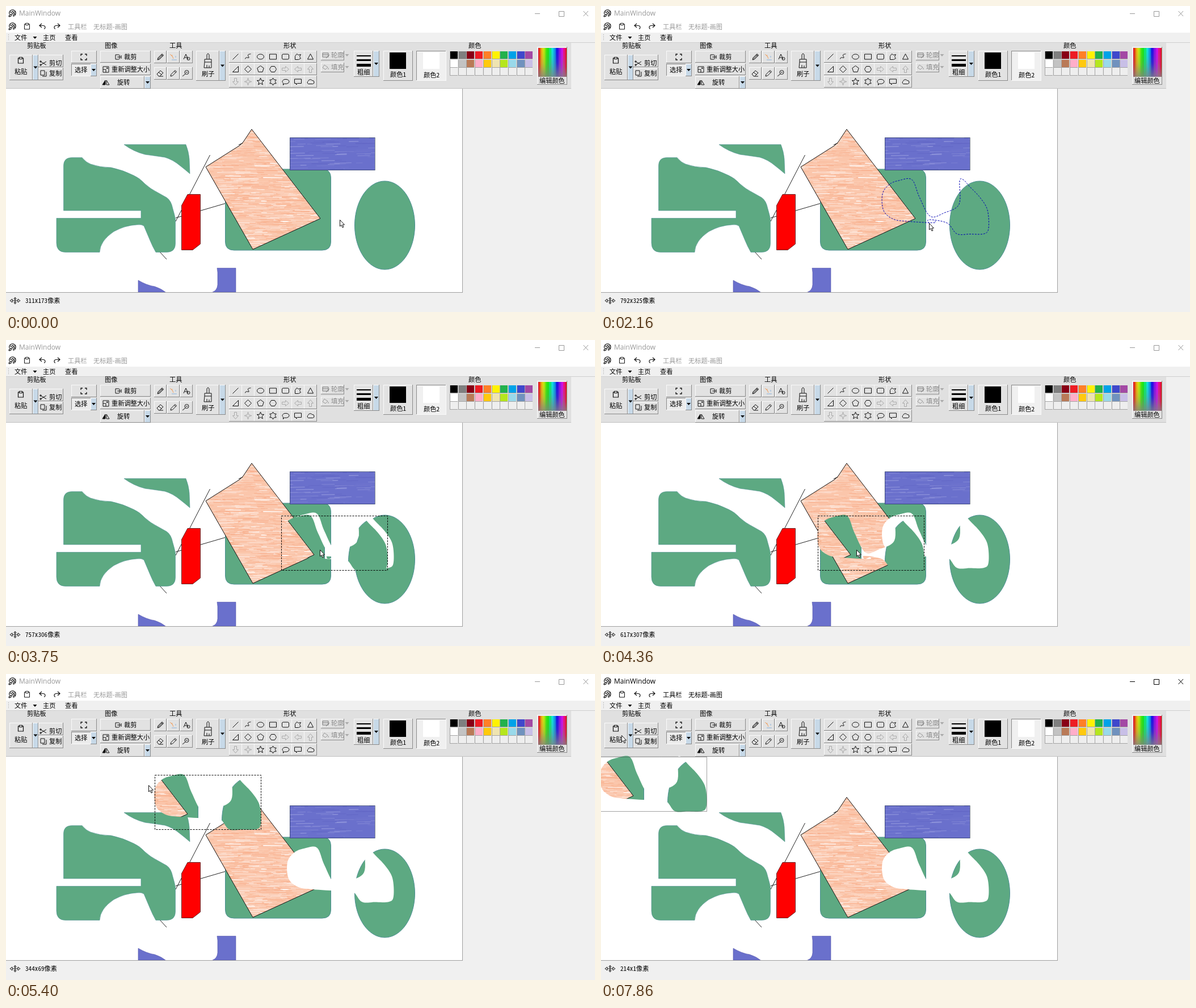
Recreate the animation shown at these times as an HTML page with a canvas. Size 1038 by 540 pixels, loop 8000 ms.

```html
<!DOCTYPE html>
<html lang="zh">
<head>
<meta charset="utf-8">
<title>MainWindow</title>
<style>
html, body { margin: 0; width: 100%; height: 100%; overflow: hidden; background: #f0f0f0; }
canvas { display: block; }
</style>
</head>
<body>
<script>
const W = 1038, H = 540, LOOP = 8000;
const SONG = '11.2px "Noto Sans Mono CJK SC", "Noto Sans CJK SC", "Noto Sans CJK", monospace';
const HEI = '11.2px "Noto Sans CJK SC", "Noto Sans CJK", sans-serif';
const LATIN = '12px "Open Sans", "Noto Sans", sans-serif';
const GREEN = '#5da982', EDGE = '#4c8f93', PURPLE = '#6a70cc';

let seed = 7;
function rnd() {
  seed = (seed * 16807) % 2147483647;
  return seed / 2147483647;
}

function layer() {
  const c = document.createElement('canvas');
  c.width = W;
  c.height = H;
  return c.getContext('2d');
}

function rect(g, x, y, w, h, color) {
  g.fillStyle = color;
  g.fillRect(x, y, w, h);
}

function text(g, s, x, y, color = '#000', font = SONG) {
  g.font = font;
  g.textBaseline = 'middle';
  g.fillStyle = color;
  g.fillText(s, x, y);
}

function shape(g, d, fill, stroke, width = 1) {
  const p = new Path2D(d);
  if (fill) { g.fillStyle = fill; g.fill(p); }
  if (stroke) { g.strokeStyle = stroke; g.lineWidth = width; g.stroke(p); }
}

function icon(g, d, x, y, { stroke = '#111', fill, width = 1, turn = 0 } = {}) {
  g.save();
  g.translate(x, y);
  g.rotate(turn * Math.PI / 2);
  shape(g, d, fill, stroke, width);
  g.restore();
}

function dashedBox(g, x, y, w, h, dash, color = '#000') {
  g.save();
  g.setLineDash(dash);
  g.strokeStyle = color;
  g.lineWidth = 1;
  g.strokeRect(x + .5, y + .5, w, h);
  g.restore();
}

function button(g, x, y, w, h, { sunken = false, fill = '#e2e2e2' } = {}) {
  const light = '#fafafa', dark = '#8a8a8a';
  rect(g, x, y, w, h, sunken ? light : dark);
  rect(g, x, y, w - 1, h - 1, sunken ? dark : light);
  rect(g, x + 1, y + 1, w - 2, h - 2, fill);
}

function arrow(g, x, y, color = '#000') {
  icon(g, 'M-3.5-2H3.5L0 2Z', x, y, { fill: color, stroke: null });
}

function dropdown(g, x, y, w, h) {
  button(g, x, y, w, h, { fill: '#c7d9e8' });
  arrow(g, x + w / 2, y + h / 2);
}

// Regular polygon, or a star when the inner radius is given
function polygon(n, r, inner) {
  const m = inner ? 2 * n : n;
  let d = '';
  for (let i = 0; i < m; i++) {
    const a = i / m * 2 * Math.PI - Math.PI / 2, q = inner && i % 2 ? inner : r;
    d += (i ? 'L' : 'M') + (q * Math.cos(a)).toFixed(2) + ' ' + (q * Math.sin(a)).toFixed(2);
  }
  return d + 'Z';
}

const CLIP = 'M-3-4H-4.5V5H4.5V-4H3M-2.5-5.5H2.5V-2.5H-2.5Z';
const PENCIL = 'M-5 5L-4 1.5L3-5.5L5.5-3L-1.5 4ZM1.5-4L4-1.5';
const BLOCK_ARROW = 'M-6-2H0V-5L6 0L0 5V2H-6Z';
const BACK = 'M-1-5L-5-1.5L-1 2M-5-1.5H1Q5-1.5 5 2Q5 4 3 4.5';
const FORTH = 'M1-5L5-1.5L1 2M5-1.5H-1Q-5-1.5-5 2Q-5 4-3 4.5';

const shapeIcons = [
  'M-5 5L5-5', 'M-5 4C-4-2 4 5 1 0S2-4 5-5', 'M-6 0a6 4.5 0 1 0 12 0a6 4.5 0 1 0-12 0',
  'M-6-4.5H6V4.5H-6Z', 'M-4-4.5H4Q6-4.5 6-2.5V2.5Q6 4.5 4 4.5H-4Q-6 4.5-6 2.5V-2.5Q-6-4.5-4-4.5Z',
  'M-5 5V-1L-2-5L1-3L5-4L3 0L5 3L1 5Z', 'M0-5L5 4.5H-5Z',
  'M5-5V5H-5Z', polygon(4, 6), polygon(5, 6), 'M-3-5H3L6 0L3 5H-3L-6 0Z',
  BLOCK_ARROW, BLOCK_ARROW, BLOCK_ARROW,
  BLOCK_ARROW, polygon(4, 6.5, 2), polygon(5, 6.5, 2.8), polygon(6, 6.5, 3.8),
  'M-2 3.5L-4 6L-4 2.5A6 4 0 1 1-2 3.5Z', 'M-6-4.5H6V3H-1L-3 5.5V3H-6Z',
  'M-4 4A3 3 0 0 1-4-1A4 4 0 0 1 3-2A3 3 0 0 1 4 4Z'
];
const turns = { 12: 2, 13: 3, 14: 1 };

function paletteIcon(g, x, y) {
  icon(g, 'M-5 1A5.7 5.7 0 1 1 2 5Q1 3 2 1M-6 6Q-5 1-2 2Q0 5-6 6M-2 2L5-3', x, y, { width: 1.2 });
  for (const [a, b] of [[-2, -2], [1, -3], [4, 1]]) rect(g, x + a - 1, y + b - 1, 2, 2, '#111');
}

function drawPaste(g, pressed) {
  button(g, 6, 86, 41, 45, { sunken: pressed });
  icon(g, CLIP, 26, 96, { width: 1.2 });
  text(g, '粘贴', 15, 116);
}

function drawColors(g) {
  const rows = [
    '000 7f7f7f 880015 ed1c24 ff7f27 fff200 22b14c 00a2e8 3f48cc a349a4',
    'fff c3c3c3 b97a57 ffaec9 ffc90e efe4b0 b5e61d 99d9ea 7092be c8bfe7',
    Array(10).fill('eee').join(' ')
  ];
  rows.forEach((row, j) => row.split(' ').forEach((c, i) => {
    const x = Math.round(782 + i * 14.7), y = 80 + Math.round(j * 14.6);
    rect(g, x, y, 14, 14, '#a5a5a5');
    rect(g, x + 1, y, 13, 13, '#' + c);
  }));
  button(g, 936, 72, 53, 67);
  for (let x = 0; x < 50; x++) {
    const hue = x * 7.2 + rnd() * 24 - 12, grad = g.createLinearGradient(0, 74, 0, 125);
    grad.addColorStop(0, `hsl(${hue},90%,48%)`);
    grad.addColorStop(.3 + rnd() * .4, `hsl(${hue},70%,48%)`);
    grad.addColorStop(1, `hsl(${hue},15%,50%)`);
    rect(g, 938 + x, 74, 1, 51, grad);
  }
  text(g, '编辑颜色', 940, 132);
}

function drawChrome(g) {
  rect(g, 0, 0, W, H, '#f0f0f0');
  rect(g, 0, 0, W, 47, '#fff');
  rect(g, 0, 64, 996, 82, '#e0e0e0');
  rect(g, 0, 64, W, 1, '#cfcfcf');
  rect(g, 0, 145, 996, 1, '#c4c4c4');
  rect(g, 0, 146, 805, 360, '#a0a0a0');
  rect(g, 0, 146, 804, 359, '#fff');

  paletteIcon(g, 11, 13);
  paletteIcon(g, 11, 36);
  icon(g, CLIP, 37, 36);
  icon(g, BACK, 64, 36, { width: 1.2 });
  icon(g, FORTH, 90, 36, { width: 1.2 });
  for (let y = 50; y < 62; y += 3) rect(g, 4, y, 1, 1, '#999');
  text(g, '文件', 15, 56);
  text(g, '主页', 65, 56);
  text(g, '查看', 104, 56);
  arrow(g, 51, 56);

  text(g, '剪贴板', 37, 70);
  text(g, '图像', 174, 70);
  text(g, '工具', 288, 70);
  text(g, '形状', 489, 70);
  text(g, '颜色', 815, 70);

  drawPaste(g, false);
  dropdown(g, 47, 86, 10, 45);
  button(g, 57, 86, 44, 22);
  button(g, 57, 109, 44, 22);
  icon(g, 'M-5-3L5 3M-5 3L5-3M-6-4h2v2h-2ZM-6 2h2v2h-2Z', 66, 101);
  icon(g, 'M-5-5H2V3H-5ZM-2 5H5V-3', 66, 119);
  text(g, '剪切', 76, 101);
  text(g, '复制', 76, 119);

  button(g, 115, 79, 45, 22);
  icon(g, 'M-5-2V-5H-2M2-5H5V-2M5 2V5H2M-2 5H-5V2', 137, 90, { width: 1.3 });
  button(g, 115, 102, 35, 22, { sunken: true, fill: '#ececec' });
  text(g, '选择', 121, 113);
  dropdown(g, 149, 102, 11, 22);

  button(g, 166, 79, 89, 21);
  icon(g, 'M-5-4H1M-5 4H1M-5-4V4M-2 0H5M2-4V4M5-3V3', 198, 90);
  text(g, '裁剪', 208, 90);
  button(g, 166, 102, 89, 20);
  icon(g, 'M-5-5H5V5H-5ZM-5 0H0V5M1-1L3-3M1-3H3V-1', 176, 112);
  text(g, '重新调整大小', 186, 112);
  button(g, 166, 124, 78, 22);
  icon(g, 'M-1-4V4H-6Z', 176, 135, { fill: '#111' });
  icon(g, 'M1-4V4H6Z', 176, 135);
  text(g, '旋转', 196, 135);
  dropdown(g, 244, 124, 11, 22);

  for (let i = 0; i < 6; i++) button(g, 261 + i % 3 * 23, i < 3 ? 79 : 108, 22, 22);
  icon(g, PENCIL, 272, 90, { fill: '#999' });
  icon(g, 'M-4-5L1 0M-1-4L2 3', 293, 90, { stroke: '#f0a060' });
  icon(g, 'M-4 5H5M3-2V1', 296, 90, { stroke: '#8db4dc' });
  icon(g, 'M-5 4L-1-5L3 4M-3 1H1M1 3a2.5 2.5 0 1 0 5 0a2.5 2.5 0 1 0-5 0', 318, 90);
  icon(g, 'M-6 1L0-5L5-1L-1 5H-3ZM-3-2L2 2M-1 5H5', 272, 119);
  icon(g, PENCIL, 295, 119);
  icon(g, 'M-2-1a3.5 3.5 0 1 0 7 0a3.5 3.5 0 1 0-7 0M-1 2L-6 6M0-1H3', 317, 118);

  button(g, 335, 79, 41, 53);
  icon(g, 'M-2-3V-11Q0-15 2-11V-3M-6-3H6V2H-6ZM-6 2L-7 12H6V2M-2 12V7M2 12V8', 356, 97);
  text(g, '刷子', 345, 120);
  dropdown(g, 376, 79, 11, 53);

  shapeIcons.forEach((d, i) => {
    const x = 393 + i % 7 * 22, y = 79 + Math.floor(i / 7) * 22;
    button(g, x, y, 23, 21);
    icon(g, d, x + 11.5, y + 10.5, { stroke: i > 10 && i < 16 ? '#aaa' : '#111', turn: turns[i] });
  });

  [['轮廓', 87], ['填充', 108]].forEach(([s, y]) => {
    button(g, 555, y - 8, 41, 17);
    text(g, s, 573, y, '#8b8b8b');
    arrow(g, 601, y, '#aaa');
  });
  icon(g, 'M-6-4H4V3H-6ZM-6-1H4M0 5L6-1', 564, 87, { stroke: '#777' });
  icon(g, 'M-3-4L3 0L-1 4L-6 1ZM4 1V4', 564, 108, { stroke: '#999' });

  button(g, 613, 79, 34, 46);
  [[87, 2], [94, 3], [102, 5]].forEach(([y, h]) => rect(g, 618, y, 25, h, '#000'));
  text(g, '粗细', 619, 117);
  dropdown(g, 647, 79, 11, 46);

  button(g, 665, 79, 52, 53);
  rect(g, 676, 82, 29, 29, '#000');
  text(g, '颜色1', 677, 121);
  button(g, 723, 79, 53, 53, { sunken: true, fill: '#f0f0f0' });
  rect(g, 735, 82, 29, 29, '#fff');
  text(g, '颜色2', 736, 122);
  drawColors(g);

  icon(g, 'M-5 0H5M0-4V4', 16, 520);
  for (let i = 0; i < 4; i++) {
    icon(g, i % 2 ? 'M3-2L6 0L3 2Z' : 'M5-3L9 0L5 3Z', 16, 520, { fill: '#fff', turn: i });
  }
}

// Short horizontal strokes inside an outline
function streaks(g, d, base, [x, y, w, h], count, colors, slope) {
  g.save();
  g.clip(new Path2D(d));
  rect(g, x, y, w, h, base);
  for (let i = 0; i < count; i++) {
    const a = x - 20 + rnd() * (w + 20), b = y + rnd() * h, len = 8 + rnd() * 30;
    g.strokeStyle = colors[Math.floor(rnd() * colors.length)];
    g.lineWidth = .6 + rnd() * .8;
    g.beginPath();
    g.moveTo(a, b);
    g.lineTo(a + len, b + len * slope);
    g.stroke();
  }
  g.restore();
}

function drawPage(g) {
  rect(g, 0, 146, 804, 359, '#fff');
  shape(g, 'M299 380L359.5 263M299 374L388 348M262 424L283 447', null, '#222');
  shape(g, 'M101.5 361V282Q101.5 267.5 116 267.5H134Q141 276 149 279Q166 285 185 285Q205 289 225 299' +
    'Q236 304 245 314Q255 323 267 329L283 338Q291 343 294 358Q297 368 298.5 376V419' +
    'Q298.5 434.5 283 434.5H264Q258 424 254 414L243 388Q239 385 231 386Q210 387 190 398Q166 414 165 434.5' +
    'H105Q89 434.5 89 418V374.5H238V361Z', GREEN, EDGE, .6);
  shape(g, 'M208 244.5H317Q322 257 323 270L324 296Q316 289 307 282Q294 271 280 267Q260 264 245 262Q225 257 208 244.5Z', GREEN, EDGE, .6);
  shape(g, 'M320 332.5H342.5V420L329 430.5H309.5V352Z', '#f00', '#622');
  shape(g, 'M402 288H557Q572.5 288 572.5 303V416Q572.5 431 557 431H402Q386.5 431 386.5 416V303Q386.5 288 402 288Z', GREEN, EDGE);
  shape(g, 'M614.5 387a53 78 0 1 0 106 0a53 78 0 1 0-106 0', GREEN, EDGE);

  const sheet = 'M433 217.5L554 375L435 429.5L352 284L412 246L418 240Z';
  const area = [352, 217, 203, 213];
  streaks(g, sheet, '#fbc6ab', area, 1900, ['#f8b08f', '#f9b898', '#fbc6ab', '#fcd8c6', '#fde4d8'], .01);
  streaks(g, sheet, 'rgba(0,0,0,0)', area, 80, ['#fff', '#fff4ee'], .01);
  shape(g, sheet + 'M410 245L417 242', null, '#111');

  streaks(g, 'M500 232H650V290H500Z', PURPLE, [500, 232, 150, 58], 80, ['#7b80d2', '#8f94db', '#6368c6', '#7075ce'], -.02);
  dashedBox(g, 500, 232, 150, 57, [1, 1], '#123');
  shape(g, 'M372 462.5H405V505H364Q372 502 373 492V470Z', PURPLE, '#55a', .6);
  shape(g, 'M233 484Q248 493 262 495Q274 499 281 505H233Z', PURPLE, '#55a', .6);
}

// Catmull-Rom curve through the points, as a fine polyline
function spline(points, steps = 8) {
  const out = [], at = i => points[Math.max(0, Math.min(points.length - 1, i))];
  for (let i = 0; i < points.length - 1; i++) {
    const [a, b, c, d] = [at(i - 1), at(i), at(i + 1), at(i + 2)];
    for (let s = 0; s < steps; s++) {
      const u = s / steps;
      out.push([0, 1].map(k => b[k] + .5 * u * (c[k] - a[k] +
        u * (2 * a[k] - 5 * b[k] + 4 * c[k] - d[k] + u * (3 * (b[k] - c[k]) + d[k] - a[k])))));
    }
  }
  out.push(points[points.length - 1]);
  return out;
}

const lasso = spline([
  [588, 379], [586, 382.5], [540, 380], [515, 376], [498, 361], [496, 332], [508, 315], [525, 308],
  [548, 306.5], [561, 337], [580, 371], [605, 365], [631, 350], [632, 309], [639, 307], [650, 319],
  [668, 338], [681, 360], [683, 392], [675, 402], [650, 402.5], [627, 402], [610, 383],
  [578, 377], [578.2, 383.3]
]);

function trace(g, points) {
  g.beginPath();
  points.forEach(p => g.lineTo(...p));
}

const chrome = layer(), page = layer(), cutPage = layer(), piece = layer();
drawChrome(chrome);
drawPage(page);
cutPage.drawImage(page.canvas, 0, 0);
trace(cutPage, lasso);
cutPage.fillStyle = '#fff';
cutPage.fill();
trace(piece, lasso);
piece.clip();
piece.drawImage(page.canvas, 0, 0);

// Piecewise linear keys: [time, value, ...]
function sample(keys, t) {
  const i = keys.findIndex(k => k[0] > t);
  if (i === 0) return keys[0].slice(1);
  if (i < 0) return keys[keys.length - 1].slice(1);
  const a = keys[i - 1], b = keys[i], u = (t - a[0]) / (b[0] - a[0]);
  return a.slice(1).map((v, k) => v + (b[k + 1] - v) * u);
}

const PRESS = 70, CLOSED = 2160, BOXED = 2710, GRAB = 3470, DROP = 5060, LEAVE = 5810;
const ACTIVE = 6360, CUT = 6500, PASTE_DOWN = 7650, PASTED = 7790;
const SEL = { x: 496, y: 306, w: 187, h: 96 }, GRIP = [68.2, 59.8];

const drawKeys = [[PRESS, 0], [1670, .9], [CLOSED, 1]];
const mouseKeys = [
  [CLOSED, 578.2, 383.3], [BOXED, 578.2, 383.3], [3340, 564.2, 365.8], [GRAB, 564.2, 365.8],
  [3750, 552.8, 369.6], [3960, 543, 370.8], [4150, 543, 370.8], [4360, 450.4, 370.4],
  [4920, 321.6, 257], [4990, 325, 245], [DROP, 330.2, 237.8], [LEAVE, 156.2, 146.7],
  [6360, 78, 95], [6640, 79, 97], [6830, 79, 97], [7110, 107, 133], [7390, 36, 108]
];

function mouseAt(t) {
  if (t < PRESS) return [588, 377];
  if (t < CLOSED) return lasso[Math.round(sample(drawKeys, t)[0] * (lasso.length - 1))];
  return sample(mouseKeys, t);
}

function status(t) {
  if (t < PRESS) return '311x173像素';
  const [x, y] = mouseAt(t > CLOSED && t < GRAB ? CLOSED : Math.min(t, LEAVE));
  return `${Math.round(x / .73)}x${Math.round((y - 146) / .73)}像素`;
}

function drawSelection(g, t) {
  if (t >= PRESS && t < BOXED) {
    const n = Math.round(sample(drawKeys, t)[0] * (lasso.length - 1));
    g.save();
    trace(g, lasso.slice(0, n + 1));
    g.setLineDash([3, 2]);
    g.strokeStyle = '#0000b4';
    g.lineWidth = 1;
    g.stroke();
    g.restore();
  } else if (t >= BOXED && t < CUT || t >= PASTED) {
    const pasted = t >= PASTED;
    const [mx, my] = mouseAt(Math.min(Math.max(t, GRAB), DROP));
    const x = pasted ? -1 : Math.round(mx - GRIP[0]);
    const y = pasted ? 146 : Math.round(my - GRIP[1]);
    g.drawImage(piece.canvas, x - SEL.x, y - SEL.y);
    dashedBox(g, x, y, SEL.w, SEL.h, pasted ? [1, 1] : [3, 2], pasted ? '#444' : '#000');
  }
}

const screen = layer();
document.body.append(screen.canvas);

function frame(now) {
  const g = screen, t = now % LOOP;
  g.drawImage(chrome.canvas, 0, 0);
  g.drawImage((t < GRAB ? page : cutPage).canvas, 0, 146, 804, 359, 0, 146, 804, 359);

  const ink = t < ACTIVE ? '#999' : '#000', barInk = t < CUT ? '#999' : '#000';
  text(g, 'MainWindow', 23, 14, ink, LATIN);
  shape(g, 'M932 13.5H941M974.5 9.5H983.5V18.5H974.5ZM1017.5 9L1026 18M1026 9L1017.5 18', null, ink);
  text(g, '工具栏', 109, 37, barInk, HEI);
  text(g, '无标题-画图', 154, 37, barInk, HEI);
  if (t >= PASTE_DOWN && t < PASTED) drawPaste(g, true);

  drawSelection(g, t);
  text(g, status(t), 34, 520);
  const [x, y] = mouseAt(t);
  icon(g, 'M.5 .5V12L3 9.5L5 14L7 13L5 9H8.5Z', Math.round(x), Math.round(y), { fill: '#fff' });
  requestAnimationFrame(frame);
}
requestAnimationFrame(frame);
</script>
</body>
</html>
```
